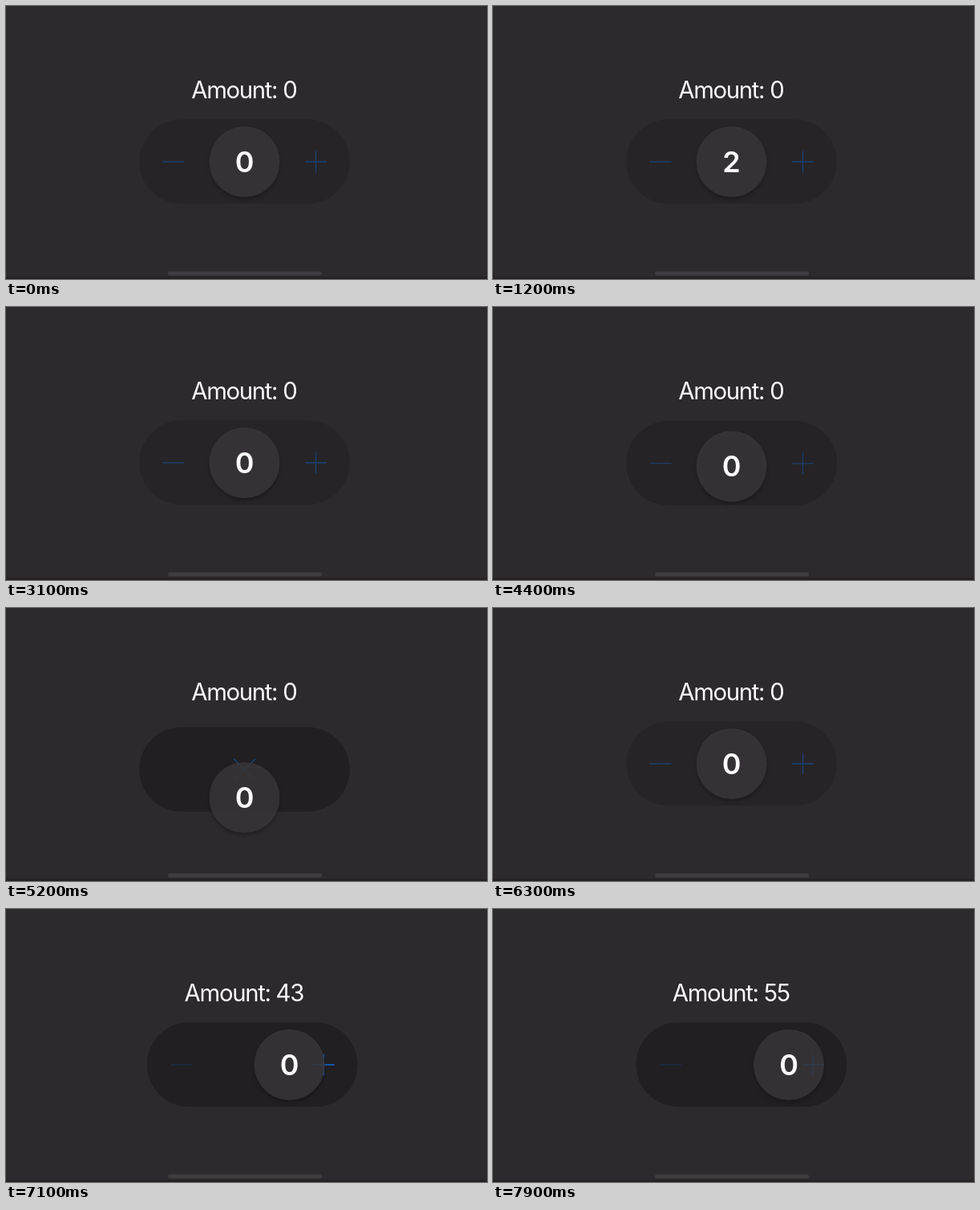
Write an HTML page that moves like this. It is 600 by 340 pixels and loops after 8 s.

```html
<!DOCTYPE html>
<html lang="en">
<head>
<meta charset="utf-8">
<title>Draggable stepper</title>
<style>
  html, body { margin: 0; width: 100%; height: 100%; overflow: hidden; background: #2d2a2d; }
  svg { display: block; width: 600px; height: 340px; }
  text { font-family: Inter, Roboto, sans-serif; fill: #fbfbfb; text-anchor: middle; }
  #amount { font-size: 29.3px; letter-spacing: -1.3px; }
  #digits text { font-size: 36px; font-weight: 600; }
  .icon { stroke: #0a6ad8; stroke-width: 1.3; fill: none; }
  .press { fill: #fff; opacity: 0; }
  #knob { filter: drop-shadow(0 3px 2px rgba(0, 0, 0, .3)); }
</style>
</head>
<body>
<svg viewBox="0 0 600 340">
  <rect y="337.5" width="600" height="2.5" fill="#252123"/>
  <rect x="202" y="330.5" width="192" height="5" rx="2.5" fill="#3f3d3f"/>
  <text id="amount" x="296.8" y="115"></text>
  <g id="track">
    <rect x="166.3" y="141.3" width="262.5" height="105" rx="52.5" fill="#262427"/>
    <rect id="shade" x="166.3" y="141.3" width="262.5" height="105" rx="52.5" fill="#211f22"/>
    <circle id="pressMinus" class="press" cx="209" cy="194" r="32"/>
    <circle id="pressPlus" class="press" cx="386.5" cy="194" r="32"/>
    <path id="minus" class="icon" d="M195.5 194h27"/>
    <path id="plus" class="icon" d="M373 194h27M386.5 180.5v27"/>
    <path id="cross" class="icon" d="M284 180.5l27 27m0-27l-27 27"/>
  </g>
  <g id="thumb">
    <circle id="knob" cx="297.5" cy="194" r="44" fill="#3a383a" fill-opacity=".82"/>
    <g id="digits">
      <text x="297.5" y="206.8">0</text>
      <text x="297.5" y="206.8">1</text>
      <text x="297.5" y="206.8">2</text>
    </g>
  </g>
</svg>
<script>
const LOOP = 8000, FOLLOW = 0.172, PX_PER_UNIT = 1.3;
const el = id => document.getElementById(id);
const digits = [...el('digits').children];

const clamp = v => Math.min(1, Math.max(0, v));
const span = (t, from, to) => clamp((t - from) / (to - from));
const step = (t, from) => span(t, from, from + 200);

// Pull down and back, then pull right and slow to a stop
const dragDown = t => 42.4 * Math.sin(Math.PI * span(t, 4200, 6100)) ** 2;
const dragRight = t => 71.5 * Math.sin(Math.PI / 2 * span(t, 6300, 7900) ** 0.53) ** 2;

const fade = (node, value) => { node.style.opacity = value; };
const move = (node, x, y) => node.setAttribute('transform', `translate(${x} ${y})`);

function draw(t) {
  const x = dragRight(t), y = dragDown(t);
  const right = clamp(x / 50), down = clamp(y / 40);

  move(el('thumb'), x, y);
  move(el('track'), x * FOLLOW, y * FOLLOW);
  el('amount').textContent = 'Amount: ' + Math.round(x / PX_PER_UNIT);

  fade(el('shade'), Math.max(right, down));
  fade(el('minus'), (0.45 - 0.23 * right) * (1 - down));
  fade(el('plus'), (0.45 + 0.55 * right) * (1 - down));
  fade(el('cross'), 0.5 * down);
  fade(el('pressPlus'), 0.07 * (step(t, 500) - step(t, 1000)));
  fade(el('pressMinus'), 0.07 * (step(t, 2000) - step(t, 2400)));

  const value = step(t, 0) + step(t, 1000) - step(t, 2400) - step(t, 2900);
  digits.forEach((digit, i) => fade(digit, clamp(1 - Math.abs(value - i))));
}

const start = performance.now();
function tick() {
  draw((performance.now() - start) % LOOP);
  requestAnimationFrame(tick);
}
tick();
</script>
</body>
</html>
```
